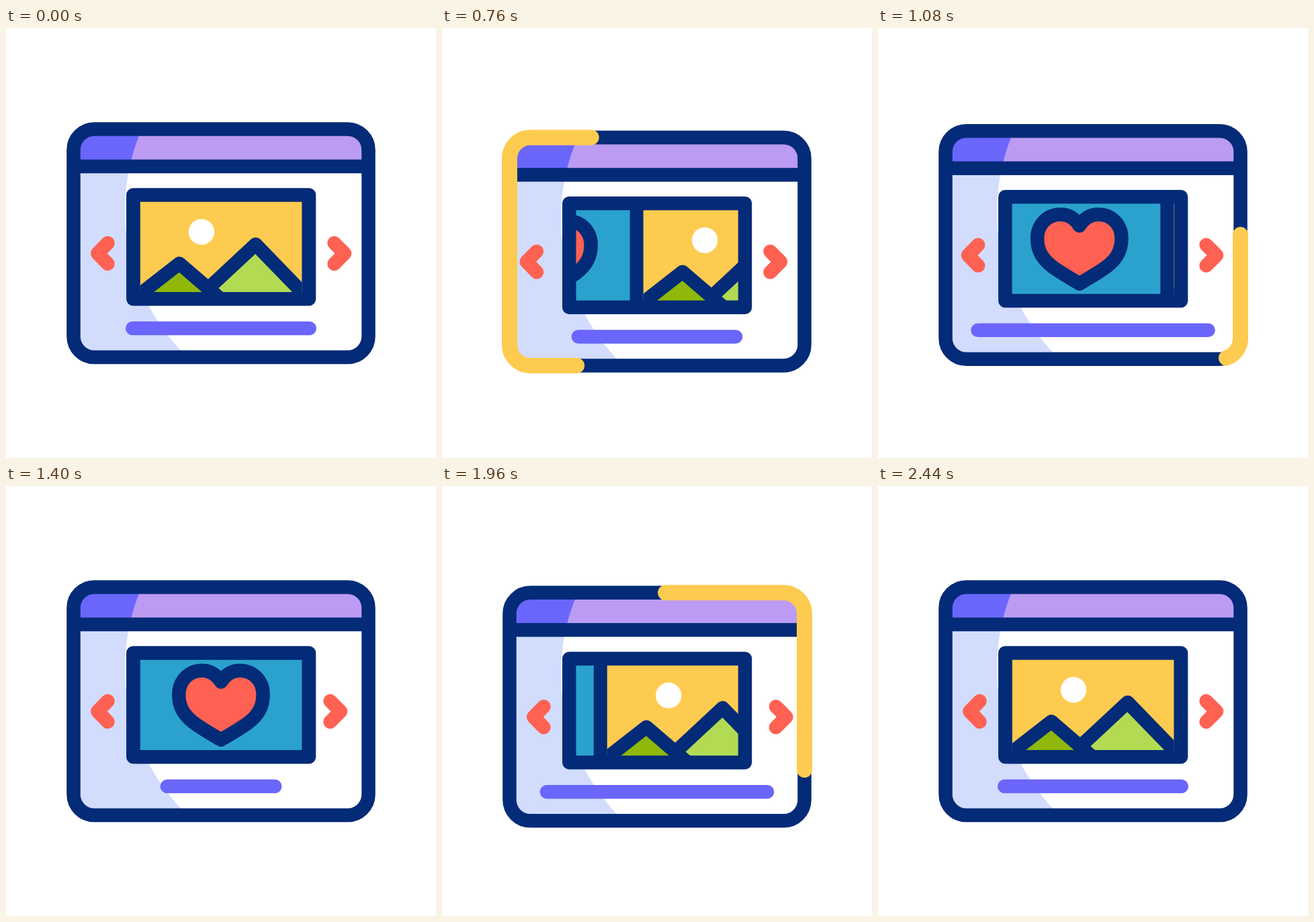
Write an HTML page that moves like this. It is 640 by 640 pixels and loops after 2640 ms.

```html
<!DOCTYPE html>
<html lang="en">
<head>
<meta charset="utf-8">
<title>Image carousel</title>
<style>
  html, body { margin: 0; width: 100%; height: 100%; overflow: hidden; background: #fff; }
  svg { display: block; width: 100%; height: 100%; }
  .line { fill: none; stroke: #032b77; stroke-width: 20.5; stroke-linecap: round; stroke-linejoin: round; }
  .arrow { stroke: #ff6152; }
  .bar { stroke: #6a66fb; }
  .runner { stroke: #fdcb50; stroke-width: 23; }
</style>
</head>
<body>
<svg viewBox="0 0 640 640">
  <defs>
    <clipPath id="inside"><rect x="100.5" y="150.5" width="439" height="339.5" rx="31"/></clipPath>
    <clipPath id="head"><rect x="100" y="150" width="440" height="56"/></clipPath>
    <clipPath id="pane"><rect x="190" y="249" width="260" height="154"/></clipPath>
    <clipPath id="slide"><rect x="199.5" y="250" width="241" height="152"/></clipPath>
    <path id="ring" d="M320 150.5H131.5A31 31 0 0 0 100.5 181.5V459A31 31 0 0 0 131.5 490H508.5A31 31 0 0 0 539.5 459V181.5A31 31 0 0 0 508.5 150.5Z"/>
  </defs>
  <g id="card">
    <g clip-path="url(#inside)">
      <rect x="100" y="150" width="440" height="340" fill="#d2dcfd"/>
      <circle cx="481" cy="271" r="304" fill="#fff"/>
      <g clip-path="url(#head)">
        <rect x="100" y="150" width="440" height="56" fill="#6a66fb"/>
        <circle cx="481" cy="271" r="304" fill="#bb9bf3"/>
      </g>
    </g>
    <path class="line" d="M110 206H530"/>
    <use href="#ring" class="line"/>

    <g clip-path="url(#pane)">
      <rect x="190" y="249" width="260" height="154" fill="#032b77"/>
      <g id="hills">
        <g clip-path="url(#slide)">
          <rect x="199" y="250" width="242" height="152" fill="#fdcb50"/>
          <circle cx="291" cy="303.5" r="19.2" fill="#fff"/>
          <path d="M189.5 404L258 350.5L320.2 404Z" fill="#8fb80a"/>
          <path d="M284 404L371.5 322L451 404Z" fill="#b2db53"/>
          <path class="line" d="M189.5 404L258 350.5L320.2 404M303 385.7L371.5 322L451 404"/>
        </g>
      </g>
      <g id="love">
        <g clip-path="url(#slide)">
          <rect x="199" y="250" width="242" height="152" fill="#2aa2cd"/>
          <path class="line" style="fill:#ff6152" d="M320 291.5C313 280.5 304 274.7 292 274.7C272 274.7 257.2 290 257.2 310.5C257.2 329 265 341 279 352C291 361 306 369.5 320 377.8C334 369.5 349 361 361 352C375 341 382.6 329 382.6 310.5C382.6 290 368 274.7 348 274.7C336 274.7 327 280.5 320 291.5Z"/>
        </g>
      </g>
    </g>
    <rect class="line" x="189.3" y="248.6" width="261.7" height="154.6"/>

    <path class="line bar" id="bar"/>
    <path class="line arrow" id="prev" d="M151.5 320L136.3 335.5L151.5 351"/>
    <path class="line arrow" id="next" d="M488.5 320L504 335.5L488.5 351"/>
    <use href="#ring" class="line runner" id="runBack"/>
    <use href="#ring" class="line runner" id="runOn" transform="translate(0 640.5) scale(1 -1)"/>
  </g>
</svg>
<script>
const LOOP = 2640, STEP = 40, GAP = 1000, PITCH = 261;
const $ = id => document.getElementById(id);
const perimeter = $("ring").getTotalLength();

const part = (t, a, b) => Math.min(1, Math.max(0, (t - a) / (b - a)));
const smooth = u => u * u * (3 - 2 * u);

// Smooth steps through [time, value] keys.
function tween(t, ...keys) {
  return keys.slice(1).reduce((v, [time, value], i) =>
    v + (value - keys[i][1]) * smooth(part(t, keys[i][0], time)), keys[0][1]);
}

// Cubic Bezier easing with handles (x1, 0) and (x2, 1).
function bezier(x1, x2, u) {
  let lo = 0, hi = 1;
  for (let i = 0; i < 24; i++) {
    const s = (lo + hi) / 2, w = 1 - s;
    if (3 * w * s * (w * x1 + s * x2) + s * s * s < u) lo = s; else hi = s;
  }
  return smooth(lo);
}

const slide = t => bezier(.44, .14, part(t, 480, 1400));
const drop = t => tween(t, [400, 0], [800, 12.8], [1200, 0]);
const push = (t, reach) => tween(t, [200, 0], [400, -6], [800, reach], [1200, 0]);
const barWidth = t => tween(t, [200, 284], [640, 229], [1070, 364], [1400, 181],
  [1720, 364], [1820, 364], [2320, 284]);

const move = (id, x, y = 0) => $(id).setAttribute("transform", `translate(${x} ${y})`);

// A strip of the ring between a leading and a trailing end.
function run(id, t, from, travel, lead, trail) {
  const tail = from + travel * smooth(part(t, ...trail));
  const len = from + travel * smooth(part(t, ...lead)) - tail;
  const { style } = $(id);
  style.display = len > 1 ? "" : "none";
  style.strokeDasharray = `${len} ${perimeter - len}`;
  style.strokeDashoffset = perimeter - tail;
}

function draw(t) {
  const t2 = t - GAP;
  const x = PITCH * (slide(t) - slide(t2));
  move("card", 0, drop(t) + drop(t2));
  move("hills", x);
  move("love", x - PITCH);
  move("prev", -push(t, 11));
  move("next", push(t2, 13));
  const half = barWidth(t) / 2 - 10.25;
  $("bar").setAttribute("d", `M${320 - half} 447H${320 + half}`);
  run("runBack", t, -90, 1250, [294, 1138], [602, 1248]);
  run("runOn", t2, -30, perimeter, [425, 1148], [671, 1228]);
}

const start = performance.now();
function tick() {
  const t = (performance.now() - start) % LOOP;
  draw(Math.floor(t / STEP) * STEP);
  requestAnimationFrame(tick);
}
tick();
</script>
</body>
</html>
```
